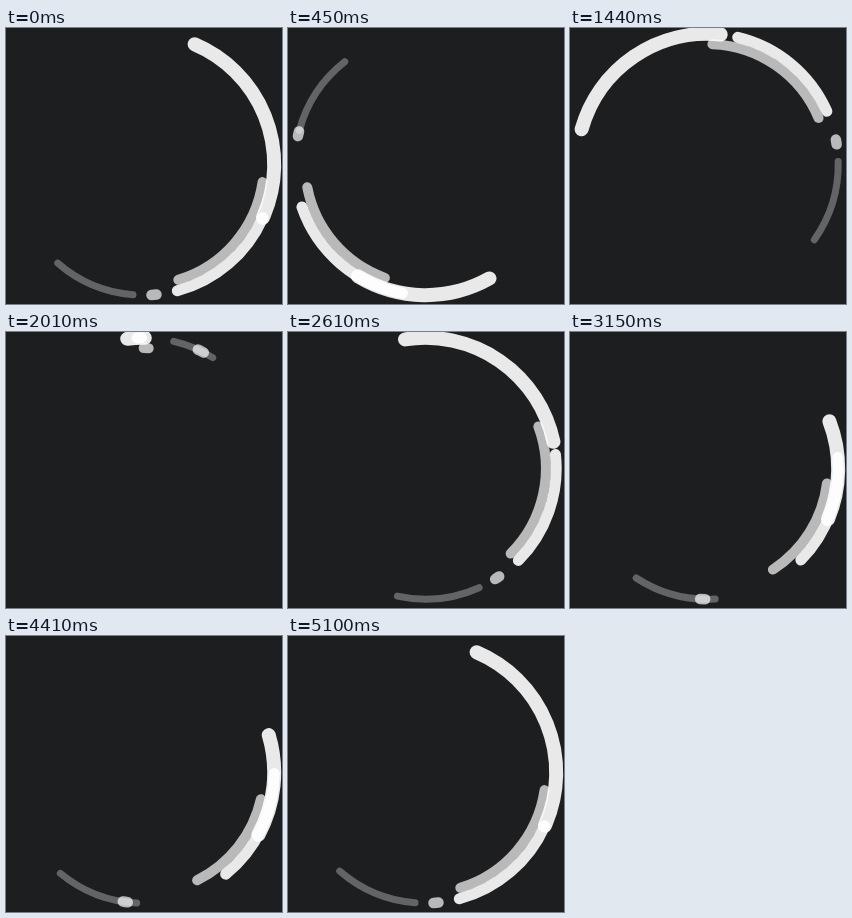
An HTML page with a canvas for the animation above (5130 ms loop, 276 px wide and 276 px high).

```html
<!DOCTYPE html>
<html lang="en">
<head>
<meta charset="utf-8">
<title>Loader</title>
<style>
  html, body { margin: 0; width: 100%; height: 100%; overflow: hidden; background: #1d1e20; }
  canvas { display: block; }
</style>
</head>
<body>
<canvas id="stage" width="276" height="276"></canvas>
<script>
const ctx = document.getElementById('stage').getContext('2d');
const LOOP = 5130, CYCLE = 35.25;        // loop in ms, cycle in 36 ms ticks
const CX = 137.5, CY = 136.5, OUTER = 130.7, INNER = 120.4;

// Ticks of the key poses; head and tail are degrees in the turning frame.
const KEYS = [0, 2.22, 16.35, 20.74, 24];
const ARCS = [
  { r: OUTER, w: 7, alpha: 0.31,
    head: [94.6, 96.9, 64.5, -12.8, 90], tail: [131, 133.4, 101, 5.8, 90.2], show: [1, 1, 1, 1, 0] },
  { r: OUTER, w: 10.5, alpha: 0.69,
    head: [84.3, 86.7, 68.6, -1.6, 63], tail: [86.5, 88.8, 70.8, 1.3, 63.2] },
  { r: INNER, w: 10, alpha: 0.69,
    head: [8.4, 10.8, -15.5, -26.1, 15.3], tail: [73.2, 76, 35, -23.7, 18] },
  { r: OUTER, w: 11, alpha: 0.9,
    head: [24, 24.6, -27.7, -29, 18.8], tail: [75, 75.4, 22.4, -27, 21.7] },
  { r: OUTER, w: 14, alpha: 0.9,
    head: [-67, -68.6, -44.5, -33.3, -40.8], tail: [24, 16.4, 0.2, -25.6, -1.4] }
];

const knot = i => KEYS[(i + 5) % 5] + CYCLE * Math.floor(i / 5);

// Monotone periodic cubic through the key poses
function ease(values, x) {
  let i = 4;
  while (KEYS[i] > x) i--;
  const val = k => values[(k + 5) % 5];
  const slope = k => (val(k + 1) - val(k)) / (knot(k + 1) - knot(k));
  const tangent = k => {
    const a = slope(k - 1), b = slope(k);
    return a * b > 0 ? 2 * a * b / (a + b) : 0;
  };
  const h = knot(i + 1) - knot(i), s = (x - knot(i)) / h, q = 1 - s;
  return val(i) * (1 + 2 * s) * q * q + val(i + 1) * s * s * (3 - 2 * s)
    + h * s * q * (tangent(i) * q - tangent(i + 1) * s);
}

function draw(t) {
  // The motion advances in ticks, with one short hold on the way
  const tick = Math.floor(t / 36 + (t < 2070 ? 0.25 : -0.5));
  const x = tick % CYCLE;
  const turn = -720 * x / CYCLE;
  const rad = deg => (deg + turn) * Math.PI / 180;

  ctx.fillStyle = '#1d1e20';
  ctx.fillRect(0, 0, 276, 276);
  ctx.lineCap = 'round';
  for (const arc of ARCS) {
    const head = ease(arc.head, x);
    const tail = Math.max(head + 0.2, ease(arc.tail, x));
    const alpha = arc.alpha * (arc.show ? ease(arc.show, x) : 1);
    ctx.strokeStyle = `rgba(255,255,255,${alpha.toFixed(3)})`;
    ctx.lineWidth = arc.w;
    ctx.beginPath();
    ctx.arc(CX, CY, arc.r, rad(head), rad(tail));
    ctx.stroke();
  }
}

const start = performance.now();
function frame() {
  draw((performance.now() - start) % LOOP);
  requestAnimationFrame(frame);
}
frame();
</script>
</body>
</html>
```
